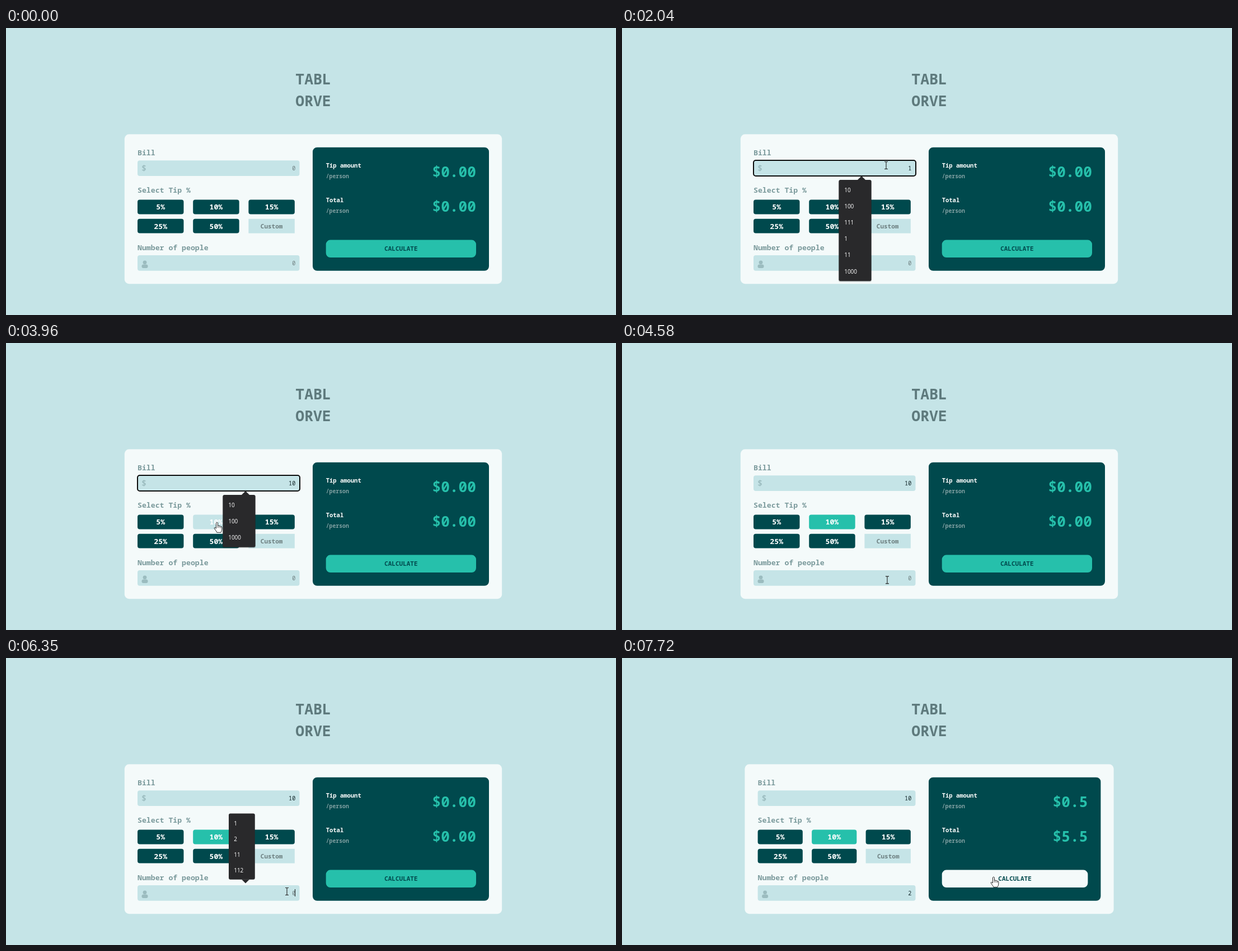
An HTML page for the animation above (8 s loop, 1090 by 514 pixels).

```html
<!DOCTYPE html>
<html lang="en">
<head>
<meta charset="utf-8">
<title>Tip calculator</title>
<style>
  html, body { margin: 0; width: 100%; height: 100%; overflow: hidden; background: #c5e4e7; }
  svg { display: block; width: 100%; height: 100%; }
  text { font-family: "Noto Sans Mono", "DejaVu Sans Mono", monospace; font-weight: 700; white-space: pre; }
  .title { font-size: 26.4px; fill: #5e7a7d; }
  .label { font-size: 13.2px; fill: #7b9a9c; }
  .tip { font-size: 13.2px; fill: #fff; }
  .custom { font-size: 11px; fill: #6d7f80; }
  .field { font-size: 10.2px; font-weight: 400; fill: #14282b; }
  .empty { fill: #6f7f80; }
  .dollar { font-size: 15px; font-weight: 600; fill: #9bbcbf; }
  .name { font-size: 10.5px; fill: #fff; }
  .per { font-size: 9.8px; fill: #7f9fa1; }
  .value { font-size: 26.2px; fill: #26c0ab; }
  .calc { font-size: 11px; fill: #00494d; }
  .menu, .hint { font-family: "Open Sans", "Noto Sans", sans-serif; font-weight: 400; fill: #fff; }
  .menu { font-size: 10px; }
  .hint { font-size: 9.2px; }
</style>
</head>
<body>
<svg id="stage" viewBox="0 0 1090 514" xmlns="http://www.w3.org/2000/svg"></svg>
<script>
const LOOP = 8000;
const LIGHT = [197, 228, 231], DARK = [0, 73, 77], TEAL = [38, 192, 171], PALE = [244, 250, 250];
const INK = '#29292b';

// Moments of the interaction, in ms
const FOCUS_BILL = 1020, TYPE_1 = 1510, TYPE_0 = 2180, PICK_TIP = 4160;
const FOCUS_PEOPLE = 6280, TYPE_2 = 6640, SUBMIT = 7510;

// Pointer hotspot: time, x, y
const PATH = [
  [190, 1002, 508], [330, 900, 455], [560, 640, 320], [800, 458, 250], [950, 472, 246],
  [2220, 472, 246], [2420, 380, 278], [2680, 296, 317], [3040, 296, 317], [3180, 296, 324],
  [3400, 305, 326], [3820, 377, 321], [4230, 377, 321], [4550, 471, 424], [4850, 570, 437],
  [5180, 570, 437], [5430, 451, 404], [5660, 475, 398], [5770, 480, 382], [5860, 477, 398],
  [5990, 480, 401], [6140, 502, 418], [6560, 502, 418], [6760, 653, 406], [6970, 664, 392]
];

const clamp = v => Math.max(0, Math.min(1, v));
const ramp = (t, a, b) => clamp((t - a) / (b - a));
const ease = p => p * p * (3 - 2 * p);
const mix = (a, b, p) => `rgb(${a.map((v, i) => Math.round(v + (b[i] - v) * p))})`;

const box = (x, y, r, b, radius, fill, extra = '') =>
  `<rect x="${x}" y="${y}" width="${r - x}" height="${b - y}" rx="${radius}" fill="${fill}" ${extra}/>`;
const label = (cls, x, y, str, anchor = 'start') =>
  `<text class="${cls}" x="${x}" y="${y}" text-anchor="${anchor}">${str}</text>`;
const group = (opacity, body) => opacity > 0 ? `<g opacity="${opacity}">${body}</g>` : '';
const at = (x, y, body) => `<g transform="translate(${x} ${y})">${body}</g>`;

function pointerAt(t) {
  if (t < PATH[0][0]) return null;
  let i = 0;
  while (i < PATH.length - 1 && PATH[i + 1][0] <= t) i++;
  const a = PATH[i], b = PATH[i + 1] || a;
  const p = b === a ? 0 : ease(ramp(t, a[0], b[0]));
  return [a[1] + (b[1] - a[1]) * p, a[2] + (b[2] - a[2]) * p];
}

// The caret restarts its blink at each focus or key press
function caret(t, starts, end, y) {
  const last = starts.filter(s => s <= t).pop();
  if (last === undefined || t >= end || (t - last) % 1060 >= 530) return '';
  return box(516, y, 517, y + 13, 0, '#111');
}

function field(left, top, value) {
  return box(left, top, 524.5, top + 27.8, 4, '#c5e4e7') +
    label('field' + (value ? '' : ' empty'), 517.3, top + 17.6, value || '0', 'end');
}

function tipButtons(t, left) {
  const span = 516 - left, w = span * .2935, step = span * .353;
  const hover5 = ramp(t, 2500, 2720) * (1 - ease(ramp(t, 3040, 3280)));
  const fills = {
    '5%': mix(DARK, LIGHT, hover5),
    '10%': t < PICK_TIP ? mix(DARK, LIGHT, ramp(t, 3740, 3950)) : mix(LIGHT, TEAL, ramp(t, PICK_TIP, 4360))
  };
  return ['5%', '10%', '15%', '25%', '50%', 'Custom'].map((name, i) => {
    const x = left + step * (i % 3), y = i < 3 ? 307.6 : 341.8, custom = i === 5;
    return box(x, y, x + w, y + 25.8, custom ? 0 : 4, custom ? mix(LIGHT, LIGHT, 0) : fills[name] || mix(DARK, DARK, 0)) +
      label(custom ? 'custom' : 'tip', x + w / 2, y + (custom ? 17 : 17.8), name, 'middle');
  }).join('');
}

function resultPanel(t, right) {
  const inner = right - 23, done = t >= SUBMIT;
  const row = (y, name, value) =>
    label('name', 571.7, y, name) + label('per', 571.7, y + 19, '/person') +
    label('value', inner, y + 16.6, value, 'end');
  return box(548, 213.7, right, 434.8, 8, '#00494d') +
    row(250, 'Tip amount', done ? '$0.5' : '$0.00') +
    row(312, 'Total', done ? '$5.5' : '$0.00') +
    box(571.7, 379.6, inner, 411, 8, mix(TEAL, PALE, ramp(t, 6590, 6880))) +
    label('calc', (571.7 + inner) / 2, 399, 'CALCULATE', 'middle');
}

const menuItems = (items, x, y, step) =>
  items.map((s, i) => label('menu', x, y + i * step, s)).join('');

function billMenu(t) {
  const short = t >= TYPE_0 + 60;
  const items = short ? ['10', '100', '1000'] : ['10', '100', '111', '1', '11', '1000'];
  const bottom = short ? 365.8 : 453.2;
  return group(ramp(t, FOCUS_BILL, 1150) * (1 - ramp(t, PICK_TIP, 4310)),
    box(386.8, 273, 446, bottom + 1.5, 3, '#000', 'opacity=".18"') +
    box(387.4, 272, 445.6, bottom, 3, INK) +
    `<path d="M420.5 272.5L428 265L435.5 272.5Z" fill="${INK}"/>` +
    menuItems(items, 397.2, 293.8, 29.15));
}

function peopleMenu(t) {
  return group(ramp(t, FOCUS_PEOPLE - 40, 6350) * (1 - ramp(t, 6620, 6808)),
    box(398, 278.5, 444.8, 396.8, 3, INK) +
    `<path d="M421 396.5L428 403.5L435 396.5Z" fill="${INK}"/>` +
    menuItems(['1', '2', '11', '112'], 407.2, 299.5, 28.1));
}

function hint(t) {
  return group(ramp(t, 2980, 3110) * (1 - ramp(t, 3260, 3400)),
    box(294.5, 336.5, 422.5, 355.5, 0, '#2b2b2b', 'stroke="#e8e8e8"') +
    label('hint', 300.8, 349.8, 'Selecione uma das opções.'));
}

const ARROW = '<path d="M0 0V13.2L3 10.4L5.1 15L7.2 14L5.1 9.6H9.3Z" fill="#fff" stroke="#111" stroke-width=".9"/>';
const BEAM = '<path d="M-3 -6.5H-1Q0 -6.5 0 -5.5Q0 -6.5 1 -6.5H3M0 -5.5V5.5M-3 6.5H-1Q0 6.5 0 5.5Q0 6.5 1 6.5H3" fill="none" stroke="#222" stroke-width="1.1"/>';
const HAND = '<path d="M-1.5 1Q0 -1.2 1.4 1V6.2Q3 5 4 6.8Q5.8 5.8 6.6 7.6Q8.6 7 8.8 9V13Q8.6 15.5 7 18.3H-.2Q-1.2 15.5 -3.5 13L-5 10.2Q-4.2 8.3 -1.5 11Z" fill="#fff" stroke="#111" stroke-width=".9"/>' +
  '<path d="M1.4 6V10M4 7V10.3M6.6 8V10.6" stroke="#111" stroke-width=".7"/>';

function pointer(t, left, right) {
  const pos = pointerAt(t);
  if (!pos) return '';
  const [x, y] = pos;
  const inside = (a, b, c, d) => x >= a && x <= c && y >= b && y <= d;
  const onField = inside(left, 237, 524, 265) || inside(left, 407, 524, 435);
  const onButton = inside(left, 307, 516, 333) || inside(left, 342, 416, 367) || inside(572, 379, right - 23, 411);
  return at(x, y, onField ? BEAM : onButton ? HAND : ARROW);
}

function view(t) {
  const inset = t >= SUBMIT ? 7.6 : 0, left = 235 + inset, right = 863 - inset;
  const bill = t < TYPE_1 ? '' : t < TYPE_0 ? '1' : '10';
  const focus = t >= FOCUS_BILL && t < PICK_TIP + 70;
  return box(0, 0, 1090, 514, 0, '#c5e4e7') +
    label('title', 549, 101.3, 'TABL', 'middle') +
    label('title', 549, 140.3, 'ORVE', 'middle') +
    box(left - 23.2, 190.3, right + 23.2, 458.2, 8, '#f4fafa') +
    label('label', left, 228, 'Bill') +
    field(left, 237.2, bill) +
    label('dollar', left + 7, 256, '$') +
    (focus ? box(235, 237, 525, 265, 4, 'none', 'stroke="#0c0c0c" stroke-width="2"') : '') +
    label('label', left, 295.2, 'Select Tip %') +
    tipButtons(t, left) +
    label('label', left, 398, 'Number of people') +
    field(left, 407, t < TYPE_2 ? '' : '2') +
    at(left + 13, 416, '<g fill="#9bbcbf"><circle cy="3.8" r="3.4"/><rect x="-5.5" y="7.6" width="11" height="6.4" rx="3"/></g>') +
    caret(t, [FOCUS_BILL, TYPE_1, TYPE_0], PICK_TIP, 244) +
    caret(t, [FOCUS_PEOPLE, TYPE_2], 7440, 414) +
    resultPanel(t, right) +
    billMenu(t) + peopleMenu(t) + hint(t) + pointer(t, left, right);
}

const stage = document.getElementById('stage');
const start = performance.now();
let shown = '';

function draw() {
  const next = view((performance.now() - start) % LOOP);
  if (next !== shown) stage.innerHTML = shown = next;
  requestAnimationFrame(draw);
}
draw();
</script>
</body>
</html>
```
